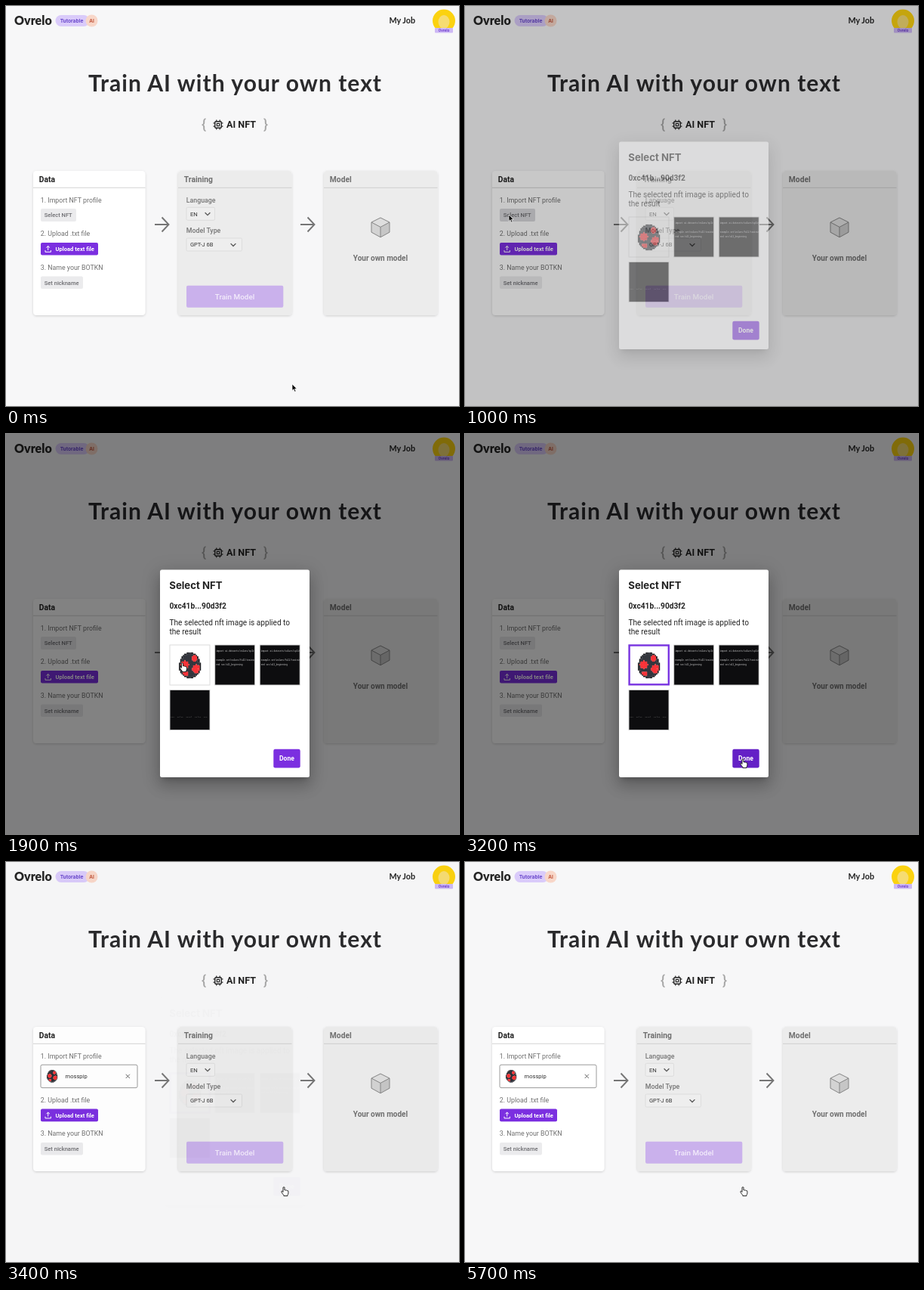
Recreate the animation shown at these times as an HTML page. Size 600 px wide and 529 px high, loop 5800 ms.

```html
<!DOCTYPE html>
<html lang="en">
<head>
<meta charset="utf-8">
<title>Train AI with your own text</title>
<style>
  html, body { margin: 0; width: 100%; height: 100%; overflow: hidden; background: #f7f7f8; }
  svg { display: block; }
  #stage { width: 600px; height: 529px; }
  text { font-family: Roboto, "Liberation Sans", sans-serif; white-space: pre; }
  .lato { font-family: Lato, sans-serif; }
  .inter { font-family: Inter, sans-serif; }
  .mono { font-family: "Noto Sans Mono", monospace; }
</style>
</head>
<body>
<svg id="stage" viewBox="0 0 600 529" xmlns="http://www.w3.org/2000/svg"></svg>
<script>
const LOOP = 5800;
const PURPLE = '#7b2fe0';
const BRAND = 'Ovrelo';

const text = (x, y, size, weight, fill, str, extra = '') =>
  `<text x="${x}" y="${y}" font-size="${size}" font-weight="${weight}" fill="${fill}" ${extra}>${str}</text>`;
const rect = (x, y, w, h, r, fill, extra = '') =>
  `<rect x="${x}" y="${y}" width="${w}" height="${h}" rx="${r}" fill="${fill}" ${extra}/>`;
const line = (d, color, width, extra = '') =>
  `<path d="${d}" fill="none" stroke="${color}" stroke-width="${width}" ${extra}/>`;
const group = (attrs, ...parts) => `<g ${attrs}>${parts.join('')}</g>`;
const middle = 'text-anchor="middle"';

// Pixel egg, 17 x 20 cells; each colour is one path so that cells join without seams
function egg() {
  const spots = [[4, 9, 3.1], [11.6, 4, 2.4], [13, 12.2, 3.2], [4.4, 16, 2]];
  const inside = (c, r) => {
    const y = (r + 0.5) / 20 - 0.57;
    const half = 8.5 * Math.sqrt(Math.max(0, 1 - (y / (y < 0 ? 0.57 : 0.43)) ** 2));
    return Math.abs(c - 8) <= half;
  };
  const paths = { '#1b1c1f': '', '#373b40': '', '#f9373c': '' };
  const [edgeColor, shell, red] = Object.keys(paths);
  for (let r = 0; r < 20; r++) for (let c = 0; c < 17; c++) {
    if (!inside(c, r)) continue;
    const edge = !inside(c - 1, r) || !inside(c + 1, r) || !inside(c, r - 1) || !inside(c, r + 1);
    const spot = spots.some(([x, y, s]) => Math.hypot(c - x, r - y) < s);
    paths[edge ? edgeColor : spot ? red : shell] += `M${c} ${r}h1v1h-1z`;
  }
  return Object.entries(paths)
    .map(([color, d]) => `<path d="${d}" fill="${color}" stroke="${color}" stroke-width=".12"/>`).join('');
}

function header() {
  return text(11, 25.3, 16, 900, '#252525', BRAND, 'class="lato"') +
    rect(65.5, 12, 45, 15, 7.5, '#dacbfa') +
    '<circle cx="113.5" cy="19.5" r="8" fill="#f8d7c9"/>' +
    text(87, 22, 6.7, 600, '#5b37c6', 'Tutorable', `class="inter" ${middle}`) +
    text(113.5, 22, 6.4, 700, '#c2563c', 'AI', `class="inter" ${middle}`) +
    text(507.5, 23.3, 10.8, 700, '#222', 'My Job', 'class="lato"') +
    '<circle cx="580" cy="19.5" r="15" fill="#fbd210"/>' +
    '<ellipse cx="580" cy="21" rx="7.5" ry="9" fill="#f6dc72"/>' +
    rect(568, 29, 24, 6.5, 1, '#cdb8f5') +
    text(580, 34, 5, 700, '#7445cf', BRAND, middle);
}

function heading() {
  let pins = '';
  for (const k of [-2.2, 2.2]) {
    pins += `M${281 + k} 150.6v2M${281 + k} 161.4v2M274.6 ${157 + k}h2M285.4 ${157 + k}h2`;
  }
  return text(303.5, 112.8, 30, 700, '#2a2a2c', 'Train AI with your own text',
      `class="lato" ${middle} letter-spacing="1.04"`) +
    text(262, 162.5, 18, 500, '#a6a6a6', '{', middle) +
    text(344, 162.5, 18, 500, '#a6a6a6', '}', middle) +
    rect(276.8, 152.8, 8.4, 8.4, 1, 'none', 'stroke="#222" stroke-width="1.4"') +
    rect(279.4, 155.4, 3.2, 3.2, 0, 'none', 'stroke="#222" stroke-width="1.2"') +
    line(pins, '#222', 1.2) +
    text(292, 161.4, 12.6, 700, '#222', 'AI NFT');
}

function card(x, w, title, active) {
  return rect(x, 218, w, 191, 4.5, active ? '#fff' : '#ececec', 'filter="url(#soft)"') +
    line(`M${x} 240.3h${w}`, active ? '#d4d4d4' : '#cfcfcf', 1) +
    text(x + 7.8, 232.8, 10.3, 700, active ? '#222' : '#707070', title);
}

const flowArrow = x => line(`M${x} 289h18M${x + 9.5} 279.5l9 9.5l-9 9.5`, '#757575', 1.9);
const chevron = (x, y) => line(`M${x - 3.4} ${y - 1.7}l3.4 3.4l3.4-3.4`, '#555', 1.3);

function dataCard() {
  const label = (y, s) => text(45.8, y, 8.8, 400, '#707070', s);
  return card(36, 148.5, 'Data', true) +
    label(259.8, '1. Import NFT profile') +
    group('id="pick"',
      rect(46, 268, 47, 17, 2, '#ebebed', 'id="pickButton"'),
      text(50.8, 279.3, 7.5, 500, '#6c6c70', 'Select NFT')) +
    group('id="picked"',
      rect(46, 268.2, 128, 30.4, 2, '#fff', 'stroke="#9a9a9a" stroke-width="1"'),
      group('transform="translate(54.2 275) scale(.82)"', egg()),
      text(78.5, 286.2, 7.6, 400, '#333', 'mosspip'),
      line('M158.7 280.8l5.2 5.2m0-5.2l-5.2 5.2', '#555', 0.9)) +
    group('id="steps"',
      label(304.3, '2. Upload .txt file'),
      rect(46, 313, 76, 16.6, 2, PURPLE),
      line('M52 323v2.3h7.4v-2.3M55.7 323v-5.5m-2.3 2.2l2.3-2.3l2.3 2.3', '#fff', 1),
      text(65.4, 324, 7.6, 700, '#fff', 'Upload text file'),
      label(348.8, '3. Name your BOTKN'),
      rect(46, 357.4, 56, 16.6, 2, '#ebebed'),
      text(50.8, 368.5, 7.5, 500, '#6c6c70', 'Set nickname'));
}

function trainingCard() {
  const outline = 'stroke="#d9d9d9" stroke-width=".8"';
  return card(228, 150.5, 'Training', false) +
    text(238.8, 260, 8.8, 500, '#757575', 'Language') +
    rect(239, 266.3, 37.5, 17, 1.5, '#eee', outline) +
    text(244, 277.6, 7.7, 400, '#333', 'EN') + chevron(267, 275) +
    text(238.8, 300.4, 8.8, 500, '#757575', 'Model Type') +
    rect(239, 307, 73.5, 17, 1.5, '#eee', outline) +
    text(244, 318.2, 7.5, 400, '#333', 'GPT-J 6B') + chevron(301, 315.8) +
    rect(239, 369.8, 128.3, 29, 2, '#cab1ec') +
    text(303, 387.8, 9.9, 500, '#f3ecfb', 'Train Model', middle);
}

function modelCard() {
  return card(421, 150.5, 'Model', false) +
    '<path d="M496 280l12 6l-12 6.4l-12-6.4z" fill="#dedede"/>' +
    '<path d="M484 286l12 6.4v13.4l-12-6.6z" fill="#d3d3d3"/>' +
    '<path d="M508 286l-12 6.4v13.4l12-6.6z" fill="#c6c6c6"/>' +
    line('M496 280l12 6v13.2l-12 6.6l-12-6.6v-13.2zM484 286l12 6.4l12-6.4M496 292.4v13.4',
      '#858585', 1, 'stroke-linejoin="round"') +
    text(496, 336.9, 10, 700, '#707070', 'Your own model', middle);
}

const tileFrame = (x, y, fill) =>
  rect(x, y, 53, 53, 0, fill, 'stroke="#d8d8d8" stroke-width=".9"');

function codeTile(x, y, rows) {
  return tileFrame(x, y, '#0d0d0f') + `<svg x="${x}" y="${y}" width="53" height="53">` +
    rows.map(([dx, dy, s]) => text(dx, dy, 2.8, 500, '#cfcfcf', s, 'class="mono"')).join('') + '</svg>';
}

// Elevation shadow: one blurred rectangle per layer
function dialogShadow() {
  const layer = (dy, blur, spread, alpha) =>
    rect(204 - spread, 179.5 - spread + dy, 198 + 2 * spread, 274.5 + 2 * spread, 2.5, '#000',
      `opacity="${alpha}" style="filter:blur(${blur / 2}px)"`);
  return layer(5.5, 7.5, -3.5, 0.2) + layer(12, 19, 1.5, 0.14) + layer(4.5, 23, 4, 0.12);
}

function dialog() {
  const script = [[1.5, 8.5, 'import ai.datasets/values/split_en'],
    [1.5, 20.5, 'example.set(values/full/training)'], [1.5, 26.5, 'end src/all_beginning']];
  const sparse = [[1, 37, '---  --:--  ----:  --:--  ---']];
  return dialogShadow() +
    rect(204, 179.5, 198, 274.5, 2.5, '#fff') +
    text(216.3, 204.8, 13.2, 700, '#222', 'Select NFT', 'class="inter"') +
    text(216.5, 230.8, 10.2, 700, '#262626', '0xc41b...90d3f2') +
    text(216.5, 253.4, 10.1, 400, '#262626', 'The selected nft image is applied to') +
    text(216.5, 265.4, 10.1, 400, '#262626', 'the result') +
    tileFrame(217, 279, '#fff') +
    group('transform="translate(229.2 289) scale(1.7)"', egg()) +
    rect(217.6, 279.5, 52.2, 51.8, 0, 'none', 'id="chosen" stroke="#7a35e2" stroke-width="2.4"') +
    codeTile(276.7, 279, script) + codeTile(336.2, 279, script) + codeTile(217, 338.4, sparse) +
    rect(354.3, 416.8, 35.4, 24.6, 2.2, PURPLE, 'id="doneButton"') +
    text(372, 432, 8.6, 700, '#fff', 'Done', middle);
}

const arrowCursor = '<path id="arrow" d="M0 0v8.6l2-1.8l1.5 3.5l1.5-.7l-1.5-3.3h2.7z" ' +
  'fill="#000" stroke="#fff" stroke-width=".7"/>';
const handCursor = '<path id="hand" d="M-1 .8a1 1 0 0 1 2 0v3.2q1-.7 1.7.2q1-.5 1.6.4q1.6-.4 1.6 1.2' +
  'v2q0 1.6-1 2.6v1.2h-5v-1q-1.6-1.6-3-4.2q-.3-1.4 1-1.2l1.1 1.2z" ' +
  'fill="#fff" stroke="#111" stroke-width=".9" stroke-linejoin="round"/>';

document.getElementById('stage').innerHTML =
  `<defs>
    <filter id="soft" x="-10%" y="-10%" width="120%" height="120%">
      <feDropShadow dx="0" dy="1" stdDeviation="1.6" flood-opacity=".17"/></filter>
  </defs>` +
  rect(0, 0, 600, 529, 0, '#f7f7f8') + header() + heading() +
  dataCard() + flowArrow(197) + trainingCard() + flowArrow(390) + modelCard() +
  rect(0, 0, 600, 529, 0, '#000', 'id="shade"') +
  group('id="dialog"', dialog()) +
  group('id="cursor"', arrowCursor, handCursor);

const part = Object.fromEntries([...document.querySelectorAll('[id]')].map(e => [e.id, e]));
const set = (id, name, value) => part[id].setAttribute(name, value);
const show = (id, on) => { part[id].style.display = on ? '' : 'none'; };

const ease = (t, from, to) => {
  const u = Math.min(1, Math.max(0, (t - from) / (to - from)));
  return u * u * (3 - 2 * u);
};

// Pointer legs: start, end, destination
const START = [379, 500];
const LEGS = [[100, 600, 58, 276], [1300, 1800, 233.5, 303], [2200, 2700, 368, 430]];

function pointer(t) {
  let [x, y] = START;
  for (const [from, to, nx, ny] of LEGS) {
    const u = ease(t, from, to);
    x += (nx - x) * u;
    y += (ny - y) * u;
  }
  return [x, y];
}

function draw(t) {
  const [x, y] = pointer(t);
  const open = ease(t, 840, 1190) - ease(t, 3205, 3415);
  const imported = t >= 3300;
  const overEgg = t > 1300 && x >= 217 && x <= 270 && y <= 332;
  const overDone = t > 2200 && x >= 354 && y >= 417;
  const hand = overEgg || overDone;

  set('cursor', 'transform', `translate(${x.toFixed(2)} ${y.toFixed(2)})`);
  show('arrow', !hand);
  show('hand', hand);

  set('shade', 'opacity', 0.49 * open);
  set('dialog', 'opacity', open);
  show('dialog', open > 0);
  show('chosen', t >= 2100);
  set('doneButton', 'fill', overDone ? '#6420c6' : PURPLE);

  const overPick = x <= 93 && y <= 285 && t < 1300;
  set('pickButton', 'fill', overPick ? '#d9d9dc' : '#ebebed');
  show('pick', !imported);
  show('picked', imported);
  set('steps', 'transform', `translate(0 ${imported ? 13.6 : 0})`);
}

const begin = performance.now();
function tick() {
  draw((performance.now() - begin) % LOOP);
  requestAnimationFrame(tick);
}
tick();
</script>
</body>
</html>
```
